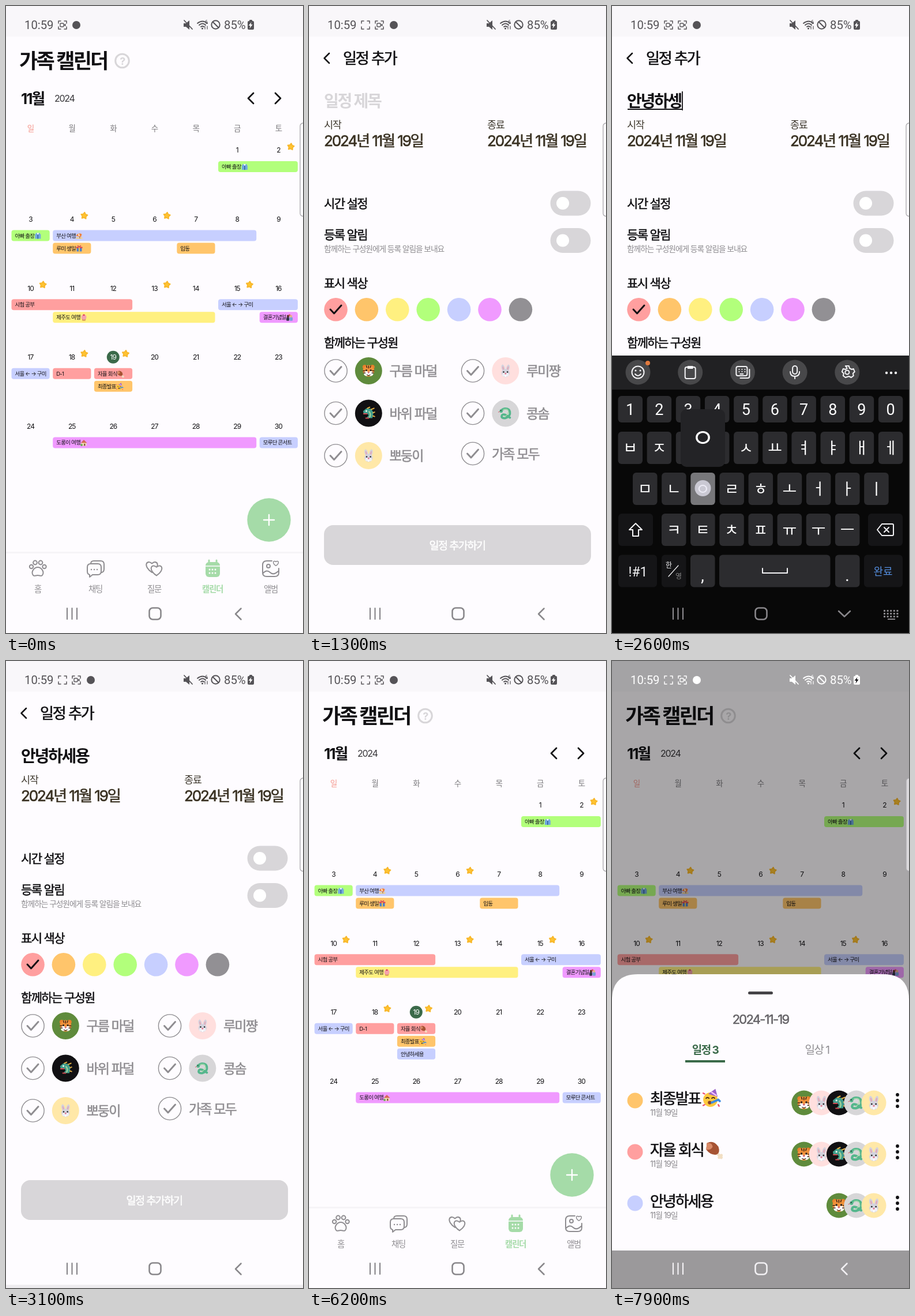
Recreate the animation shown at these times as an HTML page. Size 515 px wide and 1087 px high, loop 8000 ms.

```html
<!DOCTYPE html>
<html lang="ko">
<head>
<meta charset="utf-8">
<title>가족 캘린더</title>
<style>
html, body { margin: 0; width: 100%; height: 100%; overflow: hidden; background: #fefcff; }
svg { display: block; width: 515px; height: 1087px; }
text { font-family: Inter, "Noto Sans CJK KR", "Noto Sans KR", "Noto Sans CJK", sans-serif; letter-spacing: -.08em; white-space: pre; }
.system text { font-family: Roboto, "Noto Sans CJK KR", "Noto Sans CJK", sans-serif; letter-spacing: 0; }
</style>
</head>
<body>
<svg id="stage" viewBox="0 0 515 1087"></svg>
<script>
const DURATION = 8000, STEP = 100;
const PAGE = '#fefcff', INK = '#111013', GRAY = '#8f8d91', PALE = '#d8d6d9', GREEN = '#3b6a4a', MINT = '#a5dba8';
const [RED, ORANGE, YELLOW, LIME, LAVENDER, PINK, DARK] =
  ['#ff9f9f', '#ffc56b', '#fff080', '#b2ff7b', '#c7cfff', '#f09aff', '#929094'];
const PALETTE = [RED, ORANGE, YELLOW, LIME, LAVENDER, PINK, DARK];

// Drawing helpers
const circle = (x, y, r, fill, extra = '') => `<circle cx="${x}" cy="${y}" r="${r}" fill="${fill}" ${extra}/>`;
const ring = (x, y, r, color, width) => circle(x, y, r, 'none', `stroke="${color}" stroke-width="${width}"`);
const rect = (x, y, w, h, rx, fill, extra = '') =>
  `<rect x="${x}" y="${y}" width="${w}" height="${h}" rx="${rx}" fill="${fill}" ${extra}/>`;
const box = (x, y, w, h, rx, color, width) => rect(x, y, w, h, rx, 'none', `stroke="${color}" stroke-width="${width}"`);
const fillPath = (d, fill) => `<path d="${d}" fill="${fill}"/>`;
const line = (d, color, width) =>
  `<path d="${d}" fill="none" stroke="${color}" stroke-width="${width}" stroke-linecap="round" stroke-linejoin="round"/>`;
const at = (x, y, content, scale = 1) => `<g transform="translate(${x} ${y}) scale(${scale})">${content}</g>`;
const each = (list, draw) => [...list].map(draw).join('');

// y is the optical middle of the line; weight 'medium' thickens the regular cut slightly
function text(x, y, string, size, fill = INK, weight = 400, anchor = 'start') {
  const medium = weight === 'medium';
  return `<text x="${x}" y="${y + size * .37}" font-size="${size}" fill="${fill}" text-anchor="${anchor}" ` +
    (medium ? `stroke="${fill}" stroke-width="${size * .025}"` : `font-weight="${weight}"`) + `>${string}</text>`;
}
const centered = (x, y, string, size, fill, weight) => text(x, y, string, size, fill, weight, 'middle');
const textWidth = (string, size) => [...string].reduce((w, c) => w + (c > 'ㄱ' ? .84 : .2), 0) * size;

const check = (x, y, color) => line(`M${x - 9.5} ${y}l6.5 7l12.5-14`, color, 3);
const heart = 'M0 9C-15-1-8-12 0-5C8-12 15-1 0 9Z';
const eyes = (x, y, r) => circle(-x, y, r, '#222') + circle(x, y, r, '#222');

// Small pictures, each within a 24 px box around 0,0
const emoji = {
  tiger: circle(-7, -7, 4, '#e8802b') + circle(7, -7, 4, '#e8802b') + circle(0, 0, 10.5, '#f0913a') +
    circle(-4, 5, 4.5, '#fff') + circle(4, 5, 4.5, '#fff') + eyes(4, -1, 1.6) +
    line('M0-9v4M-4-9l1 3M4-9l-1 3M-10 0h3M10 0h-3M-9 4h3M9 4h-3', '#3a2418', 1.5) +
    fillPath('M-2.5 2h5l-2.5 3z', '#d35a68') + line('M-3 7q3 3 6 0', '#3a2418', 1.2),
  rabbit: each([-1, 1], s => `<g transform="rotate(${s * 14})"><ellipse cx="${s * 3}" cy="-6" rx="3" ry="6.5" fill="#d3d3de"/>` +
    `<ellipse cx="${s * 3}" cy="-5" rx="1.3" ry="4.5" fill="#e3a9b8"/></g>`) + circle(0, 4, 7.5, '#d3d3de') +
    circle(-3, 7, 3, '#f0f0f6') + circle(3, 7, 3, '#f0f0f6') + eyes(3.5, 2, 1.3) + circle(0, 5, 1.5, '#e2798f') +
    rect(-1.5, 8, 3, 3, .5, '#fff'),
  dragon: fillPath('M-10-4L-4-9L5-8L9-1L7 9H-4L0 4L-2 1H-9Z', '#3f9c8b') + line('M1-3q4 5 1 10', '#9dcf9b', 2.5) +
    line('M-2-9l4-2M5-7l5-2M8-1l3-1M8 5l3 1', '#e7b449', 2) + circle(-4, -4, 1.5, '#fff') +
    line('M-9 1h6M-5 9h5', '#cf4950', 2),
  snake: line('M-8-5q5-5 11-3t5 9q-1 6-9 8q-7 0-6-4t7-2l8 5', '#54b68c', 4) +
    line('M-4-7q8-2 9 3t-6 10', '#a9dda9', 1.2) +
    circle(-8, -4, 3, '#54b68c') + circle(-8.5, -5, .9, '#222') + line('M-11-3l-2 1', '#d94c55', 1),
  party: circle(-1, 2, 10, '#ffc83d') + fillPath('M-4-6l10-7l3 11z', '#9a63cc') + line('M1-8l6 4', '#f3c4ff', 2) +
    line('M-7 0q2-2 4 0M1 0q2-2 4 0', '#4a2b17', 1.5) + circle(-2, 6, 2.5, '#87402b') + line('M1 6l9-4l2 2', '#3f8de0', 3) +
    line('M-11-7l2 1M-9 9l-2 1M10 9l1 2', '#ee4f71', 2),
  meat: line('M2 3l8 8', '#f2dfc4', 4) + circle(10, 8, 2, '#f2dfc4') + circle(7, 11, 2, '#f2dfc4') +
    fillPath('M-10-9Q-1-14 6-4Q9 5 3 7Q-5 8-11 0Z', '#a65333') + fillPath('M-10-9Q-3-10-2-4Q-4 1-11 0Z', '#d98b68'),
  coat: fillPath('M-6-10h12l4 6v14h-20v-14z', '#72a9de') + fillPath('M-4-10h8l-4 7z', '#fff') + line('M0-3v12', '#2f5e9d', 3),
  beach: rect(-11, 5, 22, 5, 2, '#f2d08a') + line('M0-2l2 10', '#8a6a4a', 2) + fillPath('M-11 0Q-4-14 9-6L6 4z', '#f0813c') +
    fillPath('M-4-1l2-9l5 11z', '#fff3d8'),
  gift: rect(-9, -3, 18, 13, 1, '#4b83c9') + rect(-11, -6, 22, 5, 1, '#d84a55') + rect(-2, -6, 4, 16, 0, '#f2c14f') +
    line('M0-6l-5-4M0-6l5-4', '#d84a55', 3),
  cake: fillPath('M-8 1h16l-3 10h-10z', '#d99a5b') + circle(0, -2, 9, '#f5a3ad') + circle(0, -9, 3, '#e0404f'),
  couple: rect(-11, -2, 10, 13, 3, '#33364c') + circle(-5, -5, 4.5, '#5b3a2a') + rect(0, -2, 11, 13, 3, '#7aa0d8') +
    circle(5, -5, 4.5, '#e2b489') + circle(0, -9, 3, '#e24b65'),
  house: rect(-8, -1, 17, 11, 1, '#f4e1b8') + fillPath('M-11 0L0-11L11 0z', '#d5695a') + rect(0, 3, 5, 7, 0, '#8a5a3c') +
    circle(-8, 7, 4, '#6aae58')
};

const MEMBERS = [
  { name: '구름 마덜', face: 'tiger', back: '#5f8b3c', x: 46.5, y: 632.5 },
  { name: '루미쨩', face: 'rabbit', back: '#ffdfde', x: 284, y: 632.5 },
  { name: '바위 파덜', face: 'dragon', back: '#111013', x: 46.5, y: 706 },
  { name: '콩솜', face: 'snake', back: '#d7d6d8', x: 284, y: 706 },
  { name: '뽀둥이', face: 'rabbit', back: '#ffe8a8', x: 46.5, y: 779.5 },
  { name: '가족 모두', x: 284, y: 776 }
];
const avatar = (member, x, y, r) => circle(x, y, r, member.back) + at(x, y, emoji[member.face], r < 23 ? 1.05 : .95);

// Calendar: first day, days, lane, colour, title, picture
const EVENTS = [
  [1, 2, 0, LIME, '아빠 출장', 'coat'], [3, 1, 0, LIME, '아빠 출장', 'coat'],
  [4, 5, 0, LAVENDER, '부산 여행', 'beach'], [4, 1, 1, ORANGE, '루미 생일', 'gift'], [7, 1, 1, ORANGE, '입동'],
  [10, 3, 0, RED, '시험 공부'], [11, 4, 1, YELLOW, '제주도 여행', 'cake'], [15, 2, 0, LAVENDER, '서울 ← → 구미'],
  [16, 1, 1, PINK, '결혼기념일', 'couple'], [17, 1, 0, LAVENDER, '서울 ← → 구미'], [18, 1, 0, RED, 'D-1'],
  [19, 1, 0, RED, '자율 회식', 'meat'], [19, 1, 1, ORANGE, '최종발표', 'party'],
  [25, 5, 0, PINK, '도롱이 여행', 'house'], [30, 1, 0, LAVENDER, '모루단 콘서트']
];
const NEW_EVENT = [19, 1, 2, LAVENDER, '안녕하세용'];
const STARRED = [2, 4, 6, 10, 13, 15, 18, 19];
const column = day => (day + 4) % 7;
const dayX = day => 42.5 + 71.65 * column(day);
const dayY = day => 250 + 119.6 * Math.floor((day + 4) / 7);

const star = (x, y) => {
  const d = Array.from({ length: 10 }, (_, i) => {
    const r = i % 2 ? 3.3 : 5.8, a = i * Math.PI / 5 - 1.45;
    return `${x + r * Math.cos(a)} ${y + r * Math.sin(a)}`;
  }).join('L');
  return `<path d="M${d}Z" fill="#ffc431" stroke="#f8b72b" stroke-width="2" stroke-linejoin="round"/>`;
};

function chip([day, span, lane, color, title, picture]) {
  const x = 9.5 + 71.7 * column(day), y = dayY(day) + 19 + 22 * lane;
  return rect(x, y, 66.2 + 71.7 * (span - 1), 19, 4, color) + text(x + 6, y + 9.5, title, 9.5) +
    (picture ? at(x + 12 + textWidth(title, 9.5), y + 10, emoji[picture], .5) : '');
}

const TABS = [
  ['홈', 55, c => ring(-11, -3, 3.2, c, 2) + ring(-4.5, -10, 3.4, c, 2) + ring(5, -10, 3.4, c, 2) + ring(11.5, -3, 3.2, c, 2) +
    line('M0-2C6-2 11 5 9 10C7 15 4 12 0 12S-7 15-9 10C-11 5-6-2 0-2Z', c, 2)],
  ['채팅', 155, c => line('M-8-8q0-5 5-5h12q6 0 6 6v8q0 5-4 6M-8-8h12q6 0 6 6v7q0 6-6 6h-9l-5 4v-4q-4-1-4-6v-7q0-6 6-6z', c, 2) +
    each([-7, -2, 3], x => circle(x, 2, 1.2, c))],
  ['질문', 257, c => at(-4, -3, line(heart, c, 1.9), 1.1) + at(4, 3, fillPath(heart, PAGE) + line(heart, c, 1.9), 1.05)],
  ['캘린더', 358, c => rect(-12, -11, 25, 26, 6, c) + line('M-6-14v5M7-14v5', c, 3) + line('M-12-4h25', PAGE, 1.5) +
    each([-5, 0, 5], x => circle(x, 2, 1.5, PAGE) + circle(x, 8, 1.5, PAGE))],
  ['앨범', 459, c => line('M2-13h-9q-7 0-7 7v13q0 7 7 7h14q7 0 7-7v-7M-14 9q7-8 13-2t15-3', c, 2) + ring(-4, -4, 3, c, 2) +
    at(9, -9, line(heart, c, 3), .5)]
];

function calendar(withNewEvent) {
  const events = withNewEvent ? [...EVENTS, NEW_EVENT] : EVENTS;
  return text(23, 95, '가족 캘린더', 35, INK, 700) + ring(201.5, 95, 11.8, PALE, 3) + centered(201.5, 95, '?', 18, PALE, 700) +
    text(26, 160, '11월', 26, INK, 700) + text(84, 160, '2024', 16, '#39373b') +
    line('M429 151l-9 9l9 9M467 151l9 9l-9 9', INK, 2.8) +
    each('일월화수목금토', (d, i) => centered(42.5 + 71.65 * i, 212, d, 13.5, i ? '#7d7b7f' : '#f5978d')) +
    circle(dayX(19), 608.7, 11, GREEN) +
    each(Array(30).keys(), i => `<g style="letter-spacing:0">${centered(dayX(i + 1), dayY(i + 1), i + 1, 12, i === 18 ? '#fff' : INK)}</g>`) +
    each(STARRED, d => star(dayX(d) + 21.5, dayY(d) - 6)) + each(events, chip) +
    circle(456, 891, 37.7, MINT) + line('M447 891h18M456 882v18', '#fff', 2.4) +
    rect(0, 946, 515, 3, 0, '#f6f4f7') +
    each(TABS, ([label, x, icon], i) => at(x, 975, icon(i === 3 ? MINT : GRAY)) +
      centered(x, 1011, label, 14.4, i === 3 ? MINT : GRAY, i === 3 ? 700 : 400));
}

function toggle(y, on) {
  return rect(418.5, y - 21.5, 70, 43, 21.5, on > .5 ? GREEN : PALE) + circle(440 + 27 * on, y, 11 + 5 * on, '#fff');
}

function memberRow(member, selected) {
  const { x, y, name } = member, color = selected ? INK : GRAY;
  return (selected ? circle(x, y, 20.2, INK) : ring(x, y, 19.6, GRAY, 1.4)) + check(x, y, selected ? '#fff' : GRAY) +
    (member.face ? avatar(member, x + 56.8, y, 23.5) : '') + text(x + (member.face ? 93 : 33), y, name, 23, color, 'medium');
}

// The title as it is composed, one entry per key press
const KEYS = 'ㅇㅏㄴㄴㅕㅇㅎㅏㅅㅔㅇㅛㅇ';
const COMPOSED = 'ㅇ 아 안 안ㄴ 안녀 안녕 안녕ㅎ 안녕하 안녕핫 안녕하세 안녕하셍 안녕하세요 안녕하세용'.split(' ');
const keyIndex = t => Math.min(12, Math.floor((t - 2000) / 70) + 2);

function form(t) {
  const title = COMPOSED[keyIndex(t)], editing = t >= 1400 && t < 2800;
  const cursor = 27 + (title ? textWidth(title, 28) : 0);
  const toggled = Math.max(0, Math.min(1, (t - 3500) / 200));
  const chosen = t >= 5200 ? 4 : 0;
  const selected = [t >= 4300, t >= 4300 && t < 5000, t >= 4300 && t < 4700, t >= 4300, t >= 4300, t >= 4300 && t < 4700];
  const date = '2024년 11월 19일';
  return line('M35 82l-8.5 8.5l8.5 8.5', INK, 2.5) + text(59, 90, '일정 추가', 26, INK, 'medium') +
    text(26, 165, title || '일정 제목', 28, title ? INK : PALE, 700) +
    (editing ? rect(cursor, 148, 1.8, 33, 0, INK) + (title ? rect(27, 178, cursor - 27, 2, 0, INK) : '') : '') +
    each([[26, '시작'], [309, '종료']], ([x, label]) => text(x, 206, label, 17.5, '#3f392e') + text(x, 233, date, 26, '#3a3223', 'medium')) +
    text(26, 342, '시간 설정', 21, INK, 'medium') + toggle(342, 0) +
    text(26, 396, '등록 알림', 21, INK, 'medium') + toggle(406.5, toggled) +
    text(26, 421, '함께하는 구성원에게 등록 알림을 보내요', 13.8, GRAY) +
    text(26, 480, '표시 색상', 21, INK, 'medium') + each(PALETTE, (c, i) => circle(46.5 + 53.4 * i, 526.3, 20.3, c)) +
    check(46.5 + 53.4 * chosen, 526, INK) +
    text(26, 583, '함께하는 구성원', 21, INK, 'medium') + each(MEMBERS, (m, i) => memberRow(m, selected[i])) +
    (t === 5000 ? ring(284, 632.5, 15, '#dddbde', 1.5) : '') +
    rect(26, 900, 463, 69, 16, t >= 4300 ? GREEN : PALE) + centered(257, 935, '일정 추가하기', 18.5, '#fff', 'medium');
}

// Keyboard rows: keys, left edge, top, height
const ROWS = [['1234567890', 10.5, 676, 46], ['ㅂㅈㄷㄱㅅㅛㅕㅑㅐㅔ', 10.5, 738, 56],
  ['ㅁㄴㅇㄹㅎㅗㅓㅏㅣ', 36, 809, 56], ['ㅋㅌㅊㅍㅠㅜㅡ', 86, 880, 56]];

function keyboard(pressed) {
  const key = (x, y, w, h = 56, fill = '#2c2c2f') => rect(x, y, w, h, 6, fill), special = '#151517';
  let popup = '';
  const letters = each(ROWS, ([keys, left, y, h]) => each(keys, (letter, i) => {
    const x = left + 50.15 * i, mid = x + 21.2, down = letter === pressed;
    if (down) popup = circle(mid, y + 27, 14, '#e6e4f2', 'opacity=".75"') + rect(mid - 38.5, y - 110, 77, 100, 10, '#232326') +
      centered(mid, y - 60, letter, 44, '#fff');
    return key(x, y, 42.5, h, down ? '#77777a' : undefined) + centered(mid, y + h / 2, letter, 27, '#fff');
  }));
  const white = '#f4f4f6';
  const tools = [
    ring(0, 0, 10.5, white, 2) + line('M-5 3q5 6 10 0', white, 2) + circle(-4, -3, 1.5, white) + circle(4, -3, 1.5, white),
    box(-9, -9, 18, 20, 3, white, 2) + rect(-5, -11, 10, 5, 1, white),
    box(-11, -10, 19, 16, 3, white, 2) + line('M-4 10h13q3 0 3-3v-12M-6-5h.1M-1-5h.1M4-5h.1M-6-1h.1M-1-1h.1M4-1h.1M-4 3h5', white, 2),
    box(-4, -11, 8, 14, 4, white, 2) + line('M-8-1q0 8 8 8t8-8M0 7v4', white, 2),
    line('M-3-11h6l1 4l4 2l3-1l2 5l-3 3l1 4l-4 3l-4-2l-6 2l-4-3l1-4l-3-3l2-5l4 1l3-2z', white, 2) + ring(0, 0, 3.5, white, 2)
  ];
  return `<g class="system">${rect(0, 606, 515, 481, 0, '#080808')}${rect(0, 606, 515, 59, 0, '#212123')}` +
    each(tools, (icon, i) => circle(45 + 90.7 * i, 635, 21.5, '#48484a') + at(45 + 90.7 * i, 635, icon)) +
    circle(62, 619, 4, '#e17a3e') + each([476, 484, 492], x => circle(x, 636, 2.2, white)) + letters +
    key(11, 880, 60, 56, special) + line('M41 897l-11 11h6v11h10v-11h6z', white, 2) +
    key(444, 880, 60, 56, special) + line('M460 908l8-10h18q2 0 2 2v16q0 2-2 2h-18zM472 904l8 8M480 904l-8 8', white, 2) +
    key(11, 951.5, 67, 56, special) + centered(45, 980, '!#1', 23, white) +
    key(86, 951.5, 42.5, 56, special) + text(93, 970, '한', 12, white) + line('M98 989l17-19', white, 1.2) + text(110, 989, '영', 12, '#888') +
    key(136, 951.5, 42.5) + centered(157, 986, ',', 30, white) + key(186, 951.5, 192.5) + line('M261 975v8h43v-8', white, 2) +
    key(387, 951.5, 42.5) + centered(408, 986, '.', 30, white) +
    key(437, 951.5, 67, 56, special) + centered(470, 980, '완료', 18, '#558fe0') + popup + '</g>';
}

const AGENDA = [[ORANGE, '최종발표', 'party', [0, 1, 2, 3, 4]], [RED, '자율 회식', 'meat', [0, 1, 2, 3, 4]],
  [LAVENDER, '안녕하세용', '', [0, 3, 4]]];

function sheet() {
  return rect(0, 0, 515, 1087, 0, '#000', 'opacity=".34"') + rect(0, 1022, 515, 65, 0, '#000', 'opacity=".08"') +
    fillPath('M0 1022V588Q0 543 45 543H470Q515 543 515 588V1022Z', PAGE) + rect(236, 573, 43, 5, 2.5, '#454347') +
    centered(257.5, 621, '2024-11-19', 22, '#656367', 'medium') +
    centered(161.5, 674, '일정 3', 19, GREEN, 700) + rect(127, 692, 69, 4, 0, GREEN) + centered(355.5, 674, '일상 1', 19, GRAY) +
    each(AGENDA, ([color, title, picture, who], i) => {
      const y = 762 + 89 * i;
      return circle(40, y, 13.5, color) + text(66, y - 4, title, 26, INK, 'medium') + text(66, y + 20.5, '11월 19일', 14, GRAY) +
        (picture ? at(84.5 + textWidth(title, 26), y - 4, emoji[picture], 1.25) : '') +
        each(who, (m, j) => avatar(MEMBERS[m], 454 - 30.3 * (who.length - 1 - j), y + 4, 21.5)) +
        each([-10, 0, 10], dy => circle(495, y + dy, 2.9, INK));
    });
}

function statusBar(t, color, formOpened) {
  const frame = x => at(x, 33, line('M-7-3v-4h4M3-7h4v4M7 3v4h-4M-3 7h-4v-4', color, 1.5));
  const camera = x => frame(x) + box(x - 4, 30, 6, 6, 1, color, 1.4) + line(`M${x + 3} 33l2-1.5v3z`, color, 1.2);
  const icons = formOpened
    ? (t % 800 < 400 ? camera(98) : frame(98)) + camera(122) + circle(147, 33, 7, color)
    : camera(98) + circle(122, 33, 7, color);
  return `<g class="system">${text(32, 32.5, '10:59', 20.3, color)}${icons}` +
    fillPath('M308 30h4l6-5v16l-6-5h-4z', color) + line('M309 25l14 15', color, 1.8) +
    line('M332 30q9-7 17 0M335 33q6-5 11 0M338 36q3-2 5 0', color, 2) + circle(340.5, 39, 1.6, color) +
    text(345, 28, '6', 9, color) + line('M345 35v5M349 40v-5', color, 1.2) +
    ring(363.5, 32.5, 7.2, color, 2) + line('M358.5 27.5l10 10', color, 2) + text(378, 32.5, '85%', 20.3, color) +
    rect(419, 26, 11, 15, 2, color) + rect(422, 24, 5, 3, 1, color) +
    fillPath('M425.5 28l-5 6h3l-1 5l5-7h-3z', color === '#fff' ? INK : '#fff') + '</g>';
}

function navigation(color, typing) {
  return line('M106 1044v19M114.5 1044v19M123 1044v19', color, 2.2) + box(248.5, 1043.5, 20, 20, 6, color, 2.6) +
    line(typing ? 'M393 1049l10 9.5l10-9.5' : 'M407.5 1044.5l-9.5 9.5l9.5 9.5', color, 2.5) +
    (typing ? each(Array(15).keys(), i => rect(471 + i % 5 * 5.6, 1047 + Math.floor(i / 5) * 5, 3, 3, 0, color)) +
      rect(478, 1062, 13, 2, 0, color) : '');
}

function keyboardAmount(t) {
  const remaining = (start, length) => (1 - Math.max(0, Math.min(1, (t - start) / length))) ** 3;
  return t < 2750 ? 1 - remaining(1300, 300) : remaining(2750, 450);
}

function scene(t) {
  const formOpened = t >= 500, saved = t >= 5500, modal = t >= 7100;
  const shown = keyboardAmount(t), pressed = t < 2800 ? KEYS[keyIndex(t)] : '';
  const sheetTop = Math.max(0, 1053 * (7200 - t) / 100);
  return rect(0, 0, 515, 1087, 0, PAGE) + rect(0, 0, 515, 53, 0, '#f9f7fa') +
    (formOpened && !saved ? form(t) : calendar(saved)) +
    (shown > 0 ? `<g opacity="${Math.min(1, shown * 6)}">${at(0, 481 * (1 - shown), keyboard(pressed))}</g>` : '') +
    (modal ? at(0, sheetTop, sheet()) : '') +
    navigation(modal ? '#f2f0f3' : '#89878b', shown > .5) + statusBar(t, modal ? '#fff' : '#555357', formOpened) +
    rect(510, 203, 20, 161.5, 5, '#fefcff', 'fill-opacity=".6" stroke="#aaa8ac" stroke-width="1.3"');
}

const stage = document.getElementById('stage');
let drawn = -1;
function play() {
  const t = Math.floor(performance.now() % DURATION / STEP) * STEP;
  if (t !== drawn) stage.innerHTML = scene(drawn = t);
  requestAnimationFrame(play);
}
play();
</script>
</body>
</html>
```
